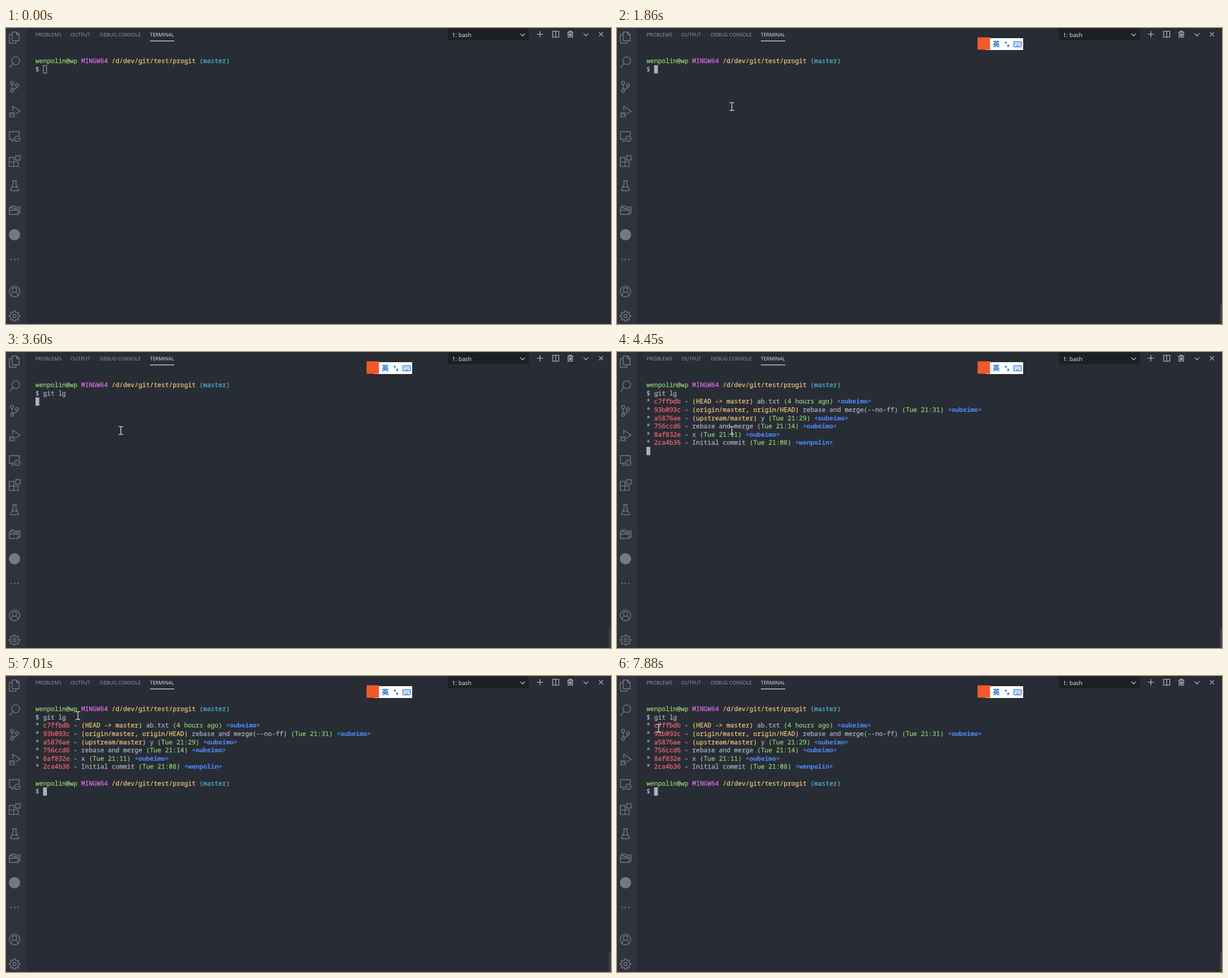
Recreate the animation shown at these times as an HTML page. Size 1068x524 px, loop 8000 ms.

```html
<!DOCTYPE html>
<html lang="en">
<head>
<meta charset="utf-8">
<title>Terminal session</title>
<style>
  html, body { margin: 0; width: 100%; height: 100%; overflow: hidden; background: #282c34; }
  svg { display: block; }
  text { text-rendering: geometricPrecision; white-space: pre; }
  #term text {
    font: 11.22px "Noto Sans Mono", monospace;
    fill: currentColor; stroke: currentColor; stroke-width: .25;
  }
  #term .blue { font-weight: 700; stroke: none; }
  .tabs { font: 8.85px "Open Sans", sans-serif; fill: #989ca4; }
  .tabs .active { fill: #e7e7e7; }
  .select { font: 10.2px "Open Sans", sans-serif; fill: #f0f0f0; }
  .mode { font: 700 12.5px "Noto Sans CJK SC", "Noto Sans CJK", sans-serif; }
  .green { color: #8fd072; } .magenta { color: #d670e6; } .yellow { color: #efc67a; }
  .cyan { color: #4fb4d4; } .red { color: #f8646f; } .blue { color: #4d8bff; } .plain { color: #abb2bf; }
  .icons { fill: none; stroke: #747982; stroke-width: 1.4; }
  .tools { fill: none; stroke: #c8cacd; stroke-width: 1.1; }
</style>
</head>
<body>
<svg width="1068" height="524" viewBox="0 0 1068 524">
  <rect width="1068" height="524" fill="#282c34"/>
  <rect width="35" height="524" fill="#2f333d"/>

  <g class="icons">
    <path d="M11 7.2h8l4.3 4.3v11H11zM18.7 7.2v4.6h4.6M11 11.5H6v15.2h11.7v-4.2"/>
    <circle cx="17.2" cy="58" r="6.9"/><path d="M12.3 63L6 70"/>
    <circle cx="10.8" cy="97.3" r="2.7"/><circle cx="19.3" cy="101.3" r="2.7"/><circle cx="10.8" cy="111" r="2.7"/>
    <path d="M10.8 100v8.3M19.3 104c0 3-2 3.7-4.5 3.7s-3.4.3-4 1.6"/>
    <path d="M12 146v-7.5L24.7 147L16 153"/>
    <ellipse cx="10.5" cy="153.5" rx="3" ry="3.9"/>
    <path d="M7.5 152h6M5 149.5l3 1.6M5 154h2.6M5 158.3l3-2M16 149.5l-3 1.6M16 154h-2.6M16 158.3l-3-2" stroke-width="1.1"/>
    <path d="M14 197H6v-13.5h17.5v7M9 200.3h5.5"/>
    <circle cx="20" cy="196" r="4.8"/><path d="M17.6 195l1.6 1.6-1.6 1.6M22.4 193.6l-1.6 1.6 1.6 1.6" stroke-width="1"/>
    <path d="M5.7 229h8.2v8.1h7.6v8H5.7zM5.7 237.1h8.2v8M17 226h8v7.8h-8z"/>
    <path d="M10.5 270.5h9M12.5 270.5v6L8 286.5q-.6 1.5 1 1.5h12q1.6 0 1-1.5L17.5 276.5v-6M10.4 281.5h9.2"/>
    <path d="M6 330v-12h5.5l1.7 2h8.3v10zM6 322.5h15.5M9 318v-3h5l1.7 2h9v10.500h-3"/>
    <circle cx="15" cy="366" r="10" fill="#747982" stroke="none"/>
    <path d="M9 409.7h0M15 409.7h0M21 409.7h0" stroke-width="2.6" stroke-linecap="round"/>
    <circle cx="15" cy="466.3" r="9.4"/><circle cx="15" cy="463.7" r="4"/>
    <path d="M8.7 473.2c1-7.4 11.6-7.4 12.6 0"/>
    <path id="gear"/><circle cx="15" cy="510" r="2.8"/>
  </g>

  <g class="tabs">
    <text x="52" y="15.2">PROBLEMS</text>
    <text x="113.7" y="15.2">OUTPUT</text>
    <text x="165.5" y="15.2">DEBUG CONSOLE</text>
    <text x="254" y="15.2" class="active">TERMINAL</text>
  </g>
  <rect x="254" y="22.3" width="43" height="1.2" fill="#e7e7e7"/>

  <rect x="780" y="1" width="143" height="20.5" fill="#1d1f23"/>
  <text x="787.5" y="16.3" class="select">1: bash</text>
  <g class="tools">
    <path d="M908 10l4 4 4-4M937 11h11M942.5 5.5v11M965 5.7h10.8v10.6H965zM970.4 5.7v10.6"/>
    <path d="M991 7.5h10.5M994.2 7.5v-2h4v2M992.3 7.5v8.7h7.8V7.5M994.7 9.5v5M996.2 9.5v5M997.7 9.5v5"/>
    <path d="M1019.5 9.7l4.2 4.2 4.2-4.2M1047 7.7l7 7M1054 7.7l-7 7"/>
  </g>

  <rect id="scroll" x="1064" y="489" width="4" height="35" fill="#3a3f49"/>

  <g id="ime">
    <rect x="650" y="18" width="67" height="21" fill="#fff"/>
    <rect x="636.5" y="16.5" width="22" height="22" fill="#f1592a"/>
    <g fill="#1b6fd0">
      <text x="663.3" y="33.3" class="mode">英</text>
      <circle cx="686.3" cy="26" r="1.7"/>
      <path d="M689 29.7h3v2.2q-.5 2-2.6 2.6l.8-2.3H689z"/>
    </g>
    <g fill="none" stroke="#1b6fd0">
      <rect x="700.6" y="24.1" width="13" height="9.3" rx="1" stroke-width="1.3"/>
      <path d="M702.5 26.7h9.5M702.5 29h9.5" stroke-width="1.2" stroke-dasharray="1.5 1.1"/>
      <path d="M704 31.3h6.5"/>
    </g>
  </g>

  <g id="term"></g>
  <rect id="caret" stroke="#abb2bf"/>
  <path id="mouse" d="M-4 -6.8h3l1 .8 1-.8h3M0 -6V6M-4 6.8h3l1-.8 1 .8h3" fill="none" stroke="#e4e5e7" stroke-width="1.2"/>
</svg>
<script>
const LOOP = 8000, LEFT = 52, TOP = 51.2, COL = 6.73, ROW = 14.6;
const $ = id => document.getElementById(id);
const term = $('term');

function setAttributes(el, attributes) {
  for (const name in attributes) el.setAttribute(name, attributes[name]);
}

function addText(row, col, color, string) {
  const el = document.createElementNS('http://www.w3.org/2000/svg', 'text');
  setAttributes(el, { x: LEFT + col * COL, y: TOP + row * ROW + 10.9, class: color });
  el.textContent = string;
  term.append(el);
  return el;
}

// Adds coloured runs, each followed by one space.
function addLine(row, ...runs) {
  let col = 0;
  return runs.map(([color, string]) => {
    const el = addText(row, col, color, string);
    col += string.length + 1;
    return el;
  });
}

const addPrompt = row => [
  ...addLine(row, ['green', 'wenpolin@wp'], ['magenta', 'MINGW64'],
    ['yellow', '/d/dev/git/test/progit'], ['cyan', '(master)']),
  addText(row + 1, 0, 'plain', '$')
];

const commits = [
  ['c7ffbdb', '(HEAD -> master)', 'ab.txt', '(4 hours ago)', 'oubeimo'],
  ['93b093c', '(origin/master, origin/HEAD)', 'rebase and merge(--no-ff)', '(Tue 21:31)', 'oubeimo'],
  ['a5876ae', '(upstream/master)', 'y', '(Tue 21:29)', 'oubeimo'],
  ['756ccd6', '', 'rebase and merge', '(Tue 21:14)', 'oubeimo'],
  ['8af832e', '', 'x', '(Tue 21:11)', 'oubeimo'],
  ['2ca4b36', '', 'Initial commit', '(Tue 21:08)', 'wenpolin']
];

addPrompt(0);
const command = addText(1, 2, 'plain', '');
const log = commits.flatMap(([hash, refs, message, date, author], i) => addLine(i + 2,
  ['plain', '*'], ['red', hash], ['plain', '-'], ...(refs ? [['yellow', refs]] : []),
  ['plain', message], ['green', date], ['blue', `<${author}>`]));
const nextPrompt = addPrompt(9);

$('gear').setAttribute('d', 'M' + Array.from({ length: 32 }, (_, i) => {
  const angle = (i - 0.5) * Math.PI / 16, radius = i % 4 < 2 ? 9.4 : 6.8;
  return [15 + radius * Math.cos(angle), 510 + radius * Math.sin(angle)].map(v => v.toFixed(2));
}).join('L') + 'Z');

// Each step: start time, then its values.
const mouseSteps = [
  [170, 708, 377], [310, 357.5, 227.5], [500, 269, 175], [670, 207, 140], [830, 202.7, 139],
  [7010, 127, 70], [7200, 66.5, 41.5], [7370, 82.7, 73.7], [7540, 92, 81.7],
  [7700, 92.7, 86.7], [7880, 73.3, 92.5]
];
const typingSteps = [[0, 0], [2730, 1], [2890, 2], [3060, 4], [3240, 5], [3410, 6]];
const stepAt = (steps, t) => steps.findLast(step => step[0] <= t);
const show = (el, on) => el.setAttribute('visibility', on ? 'visible' : 'hidden');

function drawCaret(t, typed) {
  const [row, col] = t < 3600 ? [1, 2 + typed] : t < 4450 ? [2, 0] : t < 5130 ? [8, 0] : [10, 2];
  const solid = t >= 1860, inset = solid ? 0 : 0.5;
  setAttributes($('caret'), {
    x: LEFT + col * COL + inset,
    y: TOP + row * ROW + inset,
    width: COL - 2 * inset,
    height: ROW - 2 * inset,
    fill: solid ? '#abb2bf' : 'none',
    'stroke-width': solid ? 0 : 1
  });
}

function render(now) {
  const t = now % LOOP, mouse = stepAt(mouseSteps, t), typed = stepAt(typingSteps, t)[1];
  command.textContent = 'git lg'.slice(0, typed);
  log.forEach(el => show(el, t >= 4450));
  nextPrompt.forEach(el => show(el, t >= 5130));
  show($('scroll'), t >= 170);
  show($('ime'), t >= 1860);
  show($('mouse'), mouse);
  if (mouse) $('mouse').setAttribute('transform', `translate(${mouse[1]} ${mouse[2]})`);
  drawCaret(t, typed);
}

const start = performance.now();
function tick() {
  render(performance.now() - start);
  requestAnimationFrame(tick);
}
tick();
</script>
</body>
</html>
```
